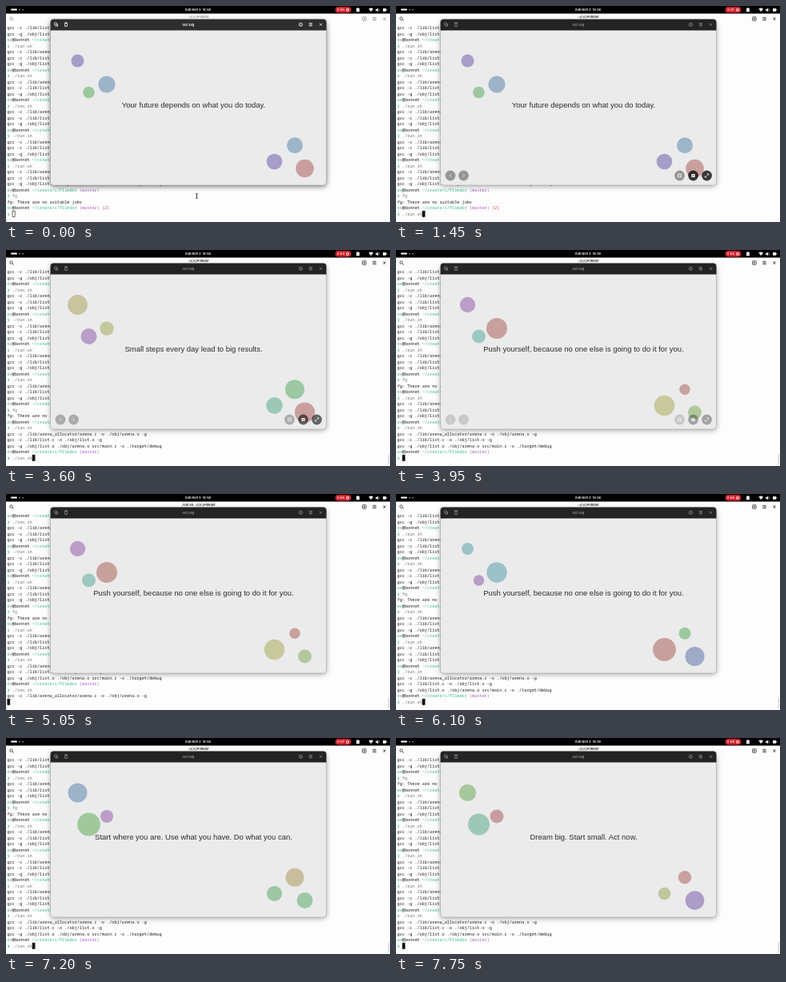
An HTML page for the animation above (8000 ms loop, 480 by 270 pixels).

```html
<!DOCTYPE html>
<html lang="en">
<head>
<meta charset="utf-8">
<title>Terminal and image viewer</title>
<style>
  html, body { margin: 0; width: 100%; height: 100%; overflow: hidden; background: #000; }
  svg { display: block; width: 100vw; height: 100vh; }
  text { white-space: pre; }
  .ui { font-family: Inter, "Open Sans", sans-serif; font-weight: 600; text-anchor: middle; }
  .term { font: 500 5.2px "Noto Sans Mono", "DejaVu Sans Mono", monospace; fill: #202020; }
  .quote { font: 9.47px "Liberation Sans", Arial, sans-serif; text-anchor: middle; fill: #2c2c2c; }
  .user { fill: #3c9d88; }
  .path { fill: #3fbd8c; }
  .branch { fill: #a962c4; }
  .code { fill: #d05550; }
  .cmd { fill: #74797a; }
  .arrow { fill: #2f9f74; }
  .line { fill: none; stroke: currentColor; stroke-width: .8; }
</style>
</head>
<body>
<svg viewBox="0 0 480 270" preserveAspectRatio="none">
  <defs>
    <filter id="blur" x="-10%" y="-10%" width="120%" height="120%"><feGaussianBlur stdDeviation="3"/></filter>
    <clipPath id="frame"><rect x="55.5" y="16.5" width="345" height="207.5" rx="4"/></clipPath>
  </defs>

  <rect y="9" width="480" height="261" fill="#fdfdfd"/>
  <g id="termHead" color="#2a2a2a">
    <g class="line">
      <circle cx="6.5" cy="15.5" r="1.7"/><path d="M7.8 16.8l1.8 1.8"/>
      <rect x="445.5" y="13.7" width="4.6" height="4.6" rx=".8"/><path d="M447.8 14.8v2.4M446.6 16h2.4"/>
      <path d="M458.2 14.3h4.6M458.2 16h4.6M458.2 17.7h4.6"/>
      <path d="M471.4 14.4l3.2 3.2M474.6 14.4l-3.2 3.2"/>
    </g>
    <text id="termTitle" class="ui" x="240.5" y="15.4" font-size="4" fill="#2a2a2a"></text>
  </g>
  <g id="rows" class="term"></g>
  <rect id="cursor" y="256.2" width="3.1" height="7.4" stroke="#111" stroke-width=".6"/>
  <rect id="scroll" x="477.8" y="255" width="1" height="13" rx=".5" fill="#c6c6c6"/>
  <path id="pointer" d="M237 234.3q1.4 0 1.4.8v4.6q0 .8-1.4.8M239.8 234.3q-1.4 0-1.4.8v4.6q0 .8 1.4.8" fill="none" stroke="#222" stroke-width=".7"/>

  <rect id="shadow" x="55" y="19" width="346" height="207" rx="5" filter="url(#blur)"/>
  <g clip-path="url(#frame)">
    <rect x="55" y="16" width="346" height="209" fill="#ebebec"/>
    <rect id="viewHead" x="55" y="16" width="346" height="14.5"/>
    <g id="viewIcons" color="#fff">
      <g class="line">
        <rect x="60.6" y="21" width="2.8" height="2.8" rx=".5"/><path d="M64.5 22.4v2.7h-2.8"/>
        <path d="M72.8 21.6h4.4M74 21.4v-.7h2v.7M73.4 22.2l.3 3.2h2.6l.3-3.2"/>
        <circle cx="368.4" cy="23.2" r="2.1"/><path d="M368.4 22.9v1.5M368.4 21.7v.5"/>
        <path d="M378.7 21.6h4.2M378.7 23.2h4.2M378.7 24.8h4.2"/>
        <path d="M392 21.7l3 3M395 21.7l-3 3"/>
      </g>
      <text class="ui" x="228" y="24.8" font-size="4.1" fill="#fff">out.svg</text>
    </g>
    <g id="dots"></g>
    <text id="quote" class="quote" x="234.5" y="127.4"></text>
    <g id="controls">
      <g opacity=".48">
        <circle cx="68" cy="212" r="6.4" fill="#3a393b"/><path d="M68.8 210.2l-1.7 1.8 1.7 1.8" stroke="#fff" fill="none" stroke-width=".8"/>
        <circle cx="84.5" cy="212" r="6.4" fill="#3a393b"/><path d="M83.7 210.2l1.7 1.8-1.7 1.8" stroke="#fff" fill="none" stroke-width=".8"/>
        <circle cx="354.5" cy="212" r="6.4" fill="#3a393b"/><rect x="352.6" y="210.1" width="3.8" height="3.8" fill="none" stroke="#fff" stroke-width=".8"/><path d="M353.4 212h2.2" stroke="#fff" stroke-width=".7"/>
      </g>
      <g fill="#000" fill-opacity=".76">
        <circle cx="371.5" cy="212" r="6.4"/><circle cx="388.5" cy="212" r="6.4"/>
      </g>
      <rect x="369.4" y="209.9" width="4.2" height="4.2" rx=".5" fill="#fff"/><path d="M370.6 212h1.8M371.5 211.1v1.8" stroke="#333" stroke-width=".6"/>
      <path d="M388.8 211.7l1.7-1.7M388.9 209.9h1.7v1.7M388.2 212.3l-1.7 1.7M388.1 214.1h-1.7v-1.7" stroke="#fff" fill="none" stroke-width=".8"/>
    </g>
  </g>
  <rect x="55.5" y="16.5" width="345" height="207.5" rx="4" fill="none" stroke="#777" stroke-opacity=".55" stroke-width=".6"/>

  <rect width="480" height="9.5" fill="#000"/>
  <g fill="#fff">
    <rect x="6" y="3.6" width="8" height="2" rx="1"/>
    <circle cx="17" cy="4.6" r=".9" opacity=".6"/><circle cx="21" cy="4.6" r=".9" opacity=".6"/>
    <text class="ui" x="240" y="6.2" font-size="4">Sun Nov 3  16:56</text>
    <rect x="411.5" y="1" width="20" height="7.6" rx="3.8" fill="#d3202c"/>
    <text id="clock" class="ui" x="418.4" y="6.2" font-size="4"></text>
    <circle cx="427" cy="4.8" r="1.9"/><rect x="426.2" y="4" width="1.6" height="1.6" fill="#d3202c"/>
    <path d="M438 3h1v-.8h1.8V3h1v4.2H438z"/>
    <path d="M453.4 3.7q2.8-2.4 5.6 0L456.2 7z"/>
    <path d="M462 4h1.2l1.7-1.5v4.8L463.2 5.8H462z"/><path d="M465.8 3.3q1.2 1.6 0 3.2" fill="none" stroke="#fff" stroke-width=".6"/>
    <rect x="471" y="3" width="4.2" height="3.8" rx=".7"/><rect x="475.4" y="4.1" width=".8" height="1.6"/>
  </g>
</svg>
<script>
const LOOP = 8000, ROWS = 32, CHAR = 3.12, LEFT = 1.6;
const $ = id => document.getElementById(id);
const clamp = v => Math.max(0, Math.min(1, v));
const mix = (a, b, p) => a + (b - a) * p;
const gray = v => `rgb(${v},${v},${v})`;

// One entry per run: typed, then the times of its outputs and of the new slide.
const run = (typed, start, list = 50, link = 100, done = 150, slide = 200) =>
  ({ typed, steps: [start, start + list, start + link], done: start + done, slide: start + slide });
const runs = [
  run(1450, 1800, 600, 850, 1050, 1100),
  run(3350, 3700), run(4650, 5050), run(6100, 6400), run(7150, 7500)
];

const centers = [[89.5, 68.5], [103.5, 108], [126, 98], [335.5, 194.5], [361, 174.3], [373.5, 203]];
// Radius and hue of each dot.
const push = "Push yourself, because no one else is going to do it for you.";
const slides = [
  ["Your future depends on what you do today.", [8, 252], [7.3, 122], [10.6, 209], [9.8, 253], [10, 206], [11.3, 2]],
  ["Small steps every day lead to big results.", [12.4, 55], [10, 277], [8.7, 65], [10.4, 158], [12, 128], [12.6, 2]],
  [push, [9.7, 284], [8.5, 170], [13, 5], [12.7, 60], [6.7, 5], [8.5, 92]],
  [push, [7.5, 187], [6.8, 276], [12.8, 189], [14.4, 2], [7.5, 122], [12, 222]],
  ["Start where you are. Use what you have. Do what you can.", [12, 209], [14.4, 115], [8.1, 286], [9.6, 128], [11.5, 45], [10, 132]],
  ["Dream big. Start small. Act now.", [10.6, 106], [13.5, 155], [8.5, 355], [7.8, 73], [8.2, 5], [11.8, 260]]
];

const span = (name, s) => `<tspan class="${name}">${s}</tspan>`;
const prompt = code => span("user", "ov") + "@bonnet " + span("path", "~/create/c/Plimdor") +
  " " + span("branch", "(master)") + (code ? " " + span("code", `[${code}]`) : "");
const command = s => span("arrow", "❯") + `<tspan class="cmd" x="${LEFT + 2 * CHAR}">${s}</tspan>`;
const build = [
  "gcc -c ./lib/arena_allocator/arena.c -o ./obj/arena.o -g",
  "gcc -c ./lib/list.c -o ./obj/list.o -g",
  "gcc -g ./obj/list.o ./obj/arena.o src/main.c -o ./target/debug"
];

const past = [];
for (let i = 0; i < 6; i++) past.push(prompt(), command("./run.sh"), ...build);
past.push(prompt(), command("fg"), "fg: There are no suitable jobs", prompt(2));

function terminal(t) {
  const lines = [...past];
  let input = t >= 900 ? "fg" : "", busy = false;
  for (const r of runs) {
    if (t < r.typed) break;
    input = "./run.sh";
    if (t < r.steps[0]) break;
    lines.push(command(input), ...build.filter((_, i) => t >= r.steps[i]));
    input = "";
    busy = t < r.done;
    if (busy) break;
    lines.push(prompt());
  }
  lines.push(busy ? "" : command(input));
  return { lines: lines.slice(-ROWS), busy, column: busy ? 0 : 2 + input.length };
}

let lastRows = "", lastSlide = -1;

function drawTerminal(t, focus) {
  const { lines, busy, column } = terminal(t);
  const html = lines.map((s, i) => `<text x="${LEFT}" y="${29.3 + 7.5 * i}">${s}</text>`).join("");
  if (html !== lastRows) $("rows").innerHTML = lastRows = html;
  $("termTitle").textContent = (busy ? "./run.sh " : "") + "~/c/c/Plimdor";
  $("termHead").setAttribute("opacity", mix(.5, 1, focus));
  $("cursor").setAttribute("x", LEFT + column * CHAR + .2);
  $("cursor").setAttribute("fill", focus > 0 ? "#111" : "none");
  $("scroll").setAttribute("opacity", t < 1800 ? 0 : 1);
  $("pointer").setAttribute("opacity", t < 100 ? 1 : 0);
}

function drawViewer(t, focus) {
  const n = runs.filter(r => t >= r.slide).length;
  if (n !== lastSlide) {
    const [text, ...dots] = slides[n];
    $("quote").textContent = text;
    $("dots").innerHTML = dots.map(([r, hue], i) =>
      `<circle cx="${centers[i][0]}" cy="${centers[i][1]}" r="${r}" fill="hsl(${hue},28%,70%)"/>`).join("");
    lastSlide = n;
  }
  $("viewHead").setAttribute("fill", gray(Math.round(mix(46, 35, focus))));
  $("viewIcons").setAttribute("opacity", mix(1, .5, focus));
  $("shadow").setAttribute("opacity", mix(.5, .3, focus));
  // Quick reveal, slow fade after three idle seconds.
  $("controls").setAttribute("opacity", clamp((t - 100) / 200) * (1 - clamp((t - 3350) / 1000)));
}

function draw(t) {
  const focus = clamp((t - 50) / 200);
  drawTerminal(t, focus);
  drawViewer(t, focus);
  $("clock").textContent = "0:0" + Math.floor((t + 250) / 1000);
}

function tick() {
  draw(performance.now() % LOOP);
  requestAnimationFrame(tick);
}
tick();
</script>
</body>
</html>
```
